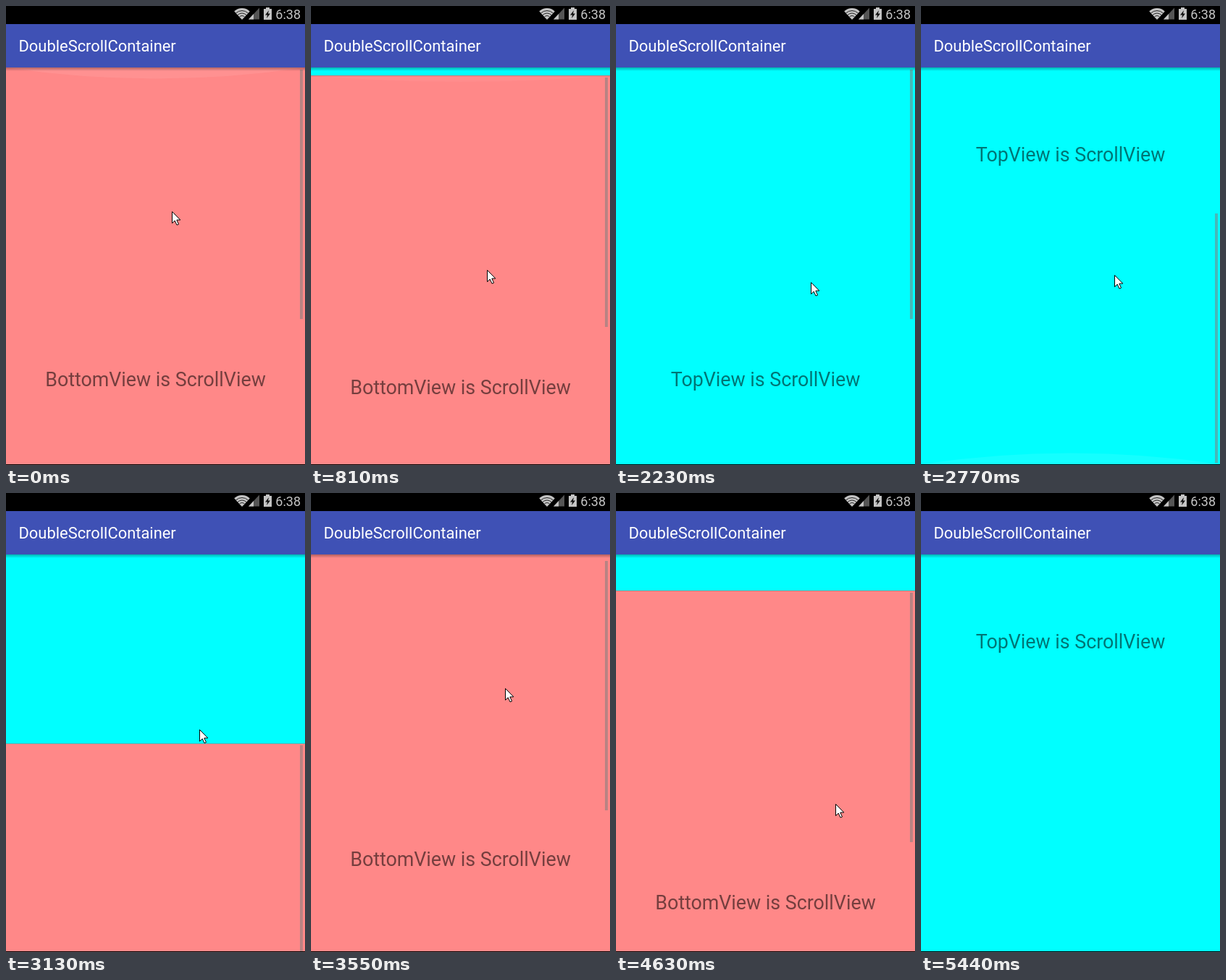
These frames come from a looping animation (413 by 635 pixels, 5720 ms). An HTML page with a canvas:

```html
<!DOCTYPE html>
<html lang="en">
<head>
<meta charset="utf-8">
<title>DoubleScrollContainer</title>
<style>
html, body { margin: 0; width: 100%; height: 100%; overflow: hidden; background: #000; }
canvas { display: block; }
</style>
</head>
<body>
<canvas id="stage" width="413" height="635"></canvas>
<script>
const c = document.getElementById('stage').getContext('2d');
const LOOP = 5720, W = 413, TOP = 85, VIEW = 549, MAX = 311;

// Turning points of the pointer: time, x, y.
const turns = [[0, 229, 284], [300, 240, 344], [570, 236, 305], [1110, 252, 447],
  [1400, 258, 250], [1950, 266, 410], [2230, 269, 382], [2450, 264, 200], [2770, 267, 372],
  [3550, 268, 270], [3800, 270, 168], [4360, 292, 385], [4630, 303, 430], [5140, 368, 623]];

const ramp = (t, from, to) => Math.min(1, Math.max(0, (t - from) / (to - from)));
const ease = x => x * x * (3 - 2 * x);
const glide = (t, from, to) => ease(ramp(t, from, to));
const pulse = (t, peak, half) => Math.max(0, 1 - Math.abs(t - peak) / half);

// Top edge of the lower panel: snaps down, up and down again.
const split = t => TOP + VIEW * (glide(t, 780, 1145) - glide(t, 2930, 3320) + glide(t, 4570, 4897));
const topScroll = t => MAX * (1 - glide(t, 1500, 1878) + glide(t, 2230, 2504));
const bottomScroll = t => MAX * (ramp(t, 3360, 3960) ** 3 - glide(t, 3960, 4254));

// Edge glow: positive at the top edge, negative at the bottom edge.
const glow = t => pulse(t, 0, 300) + pulse(t, 690, 270) + pulse(t, 2020, 230)
  + pulse(t, 4440, 180) - pulse(t, 2770, 240) - pulse(t, 3960, 200);

function rect(color, x, y, w, h) {
  c.fillStyle = color;
  c.fillRect(x, y, w, h);
}

function poly(color, points) {
  c.beginPath();
  points.forEach(([x, y]) => c.lineTo(x, y));
  c.closePath();
  c.fillStyle = color;
  c.fill();
}

function label(text, x, y, size, color, align) {
  c.font = size + 'px Roboto, sans-serif';
  c.textAlign = align;
  c.fillStyle = color;
  c.fillText(text, x, Math.round(y));
}

function drawGlow(y, power) {
  c.beginPath();
  c.moveTo(0, y);
  c.quadraticCurveTo(W / 2, y + 31 * power, W, y);
  c.fillStyle = `rgba(255,255,255,${.08 * Math.abs(power)})`;
  c.fill();
}

function panel(y, color, text, scroll, bar, power) {
  rect(color, 0, y, W, VIEW);
  label(text, W / 2, y + 441 - scroll, 26.8, 'rgba(0,0,0,.54)', 'center');
  if (bar) rect('rgba(128,128,128,.55)', 406, Math.round(y + 2.5 + scroll / MAX * 199), 4, 345);
  if (power) drawGlow(power > 0 ? y : y + VIEW, power);
}

function statusBar() {
  const light = '#c4c4c4';
  rect('#000', 0, 0, W, 25);
  c.lineWidth = 1;
  c.strokeStyle = '#222';
  for (const r of [15.5, 12, 8.5, 5]) {
    c.beginPath();
    c.moveTo(326, 18.5);
    c.arc(326, 18.5, r, -2.34, -.8);
    c.fillStyle = light;
    c.fill();
    c.beginPath();
    c.arc(326, 18.5, r, -2.34, -.8);
    if (r < 15) c.stroke();
  }
  poly('#555', [[335, 18.5], [350, 2.5], [350, 18.5]]);
  poly(light, [[335, 18.5], [342, 11], [342, 18.5]]);
  rect(light, 359, 2, 5, 3);
  rect(light, 356, 4, 11, 15);
  poly('#111', [[363, 6], [358, 12.5], [361, 12.5], [360, 17], [365, 10.5], [362, 10.5]]);
  label('6:38', 407, 18, 18, light, 'right');
}

function toolbar() {
  const shade = c.createLinearGradient(0, TOP, 0, TOP + 5);
  shade.addColorStop(0, 'rgba(0,0,0,.3)');
  shade.addColorStop(1, 'rgba(0,0,0,0)');
  rect(shade, 0, TOP, W, 5);
  rect('#3f51b5', 0, 25, W, TOP - 25);
  label('DoubleScrollContainer', 17.5, 63, 21.9, '#fff', 'left');
}

function pointer(t) {
  const i = turns.findIndex(p => p[0] > t);
  const [from, x0, y0] = turns.at(i < 0 ? -1 : i - 1), [to, x1, y1] = turns.at(i);
  const k = i < 0 ? 0 : glide(t, from, to);
  c.save();
  c.translate(Math.round(x0 + (x1 - x0) * k) + .5, Math.round(y0 + (y1 - y0) * k) + .5);
  poly('#fff', [[0, 0], [0, 16], [3.7, 12.5], [6.5, 18.5], [9, 17.5], [6.3, 11.5], [11.3, 11.5]]);
  c.strokeStyle = '#000';
  c.stroke();
  c.restore();
}

function draw(now) {
  const t = now % LOOP, y = split(t), power = glow(t), low = y < 360;

  rect('#000', 0, 0, W, 635);
  c.save();
  c.beginPath();
  c.rect(0, TOP, W, VIEW);
  c.clip();
  panel(y - VIEW, '#00ffff', 'TopView is ScrollView', topScroll(t),
    t > 1500 && t < 3100, low ? 0 : power);
  panel(y, '#ff8888', 'BottomView is ScrollView', bottomScroll(t), y < 600, low ? power : 0);
  c.restore();

  toolbar();
  statusBar();
  if (t < 5300) pointer(t);
  requestAnimationFrame(draw);
}
draw(0);
</script>
</body>
</html>
```
